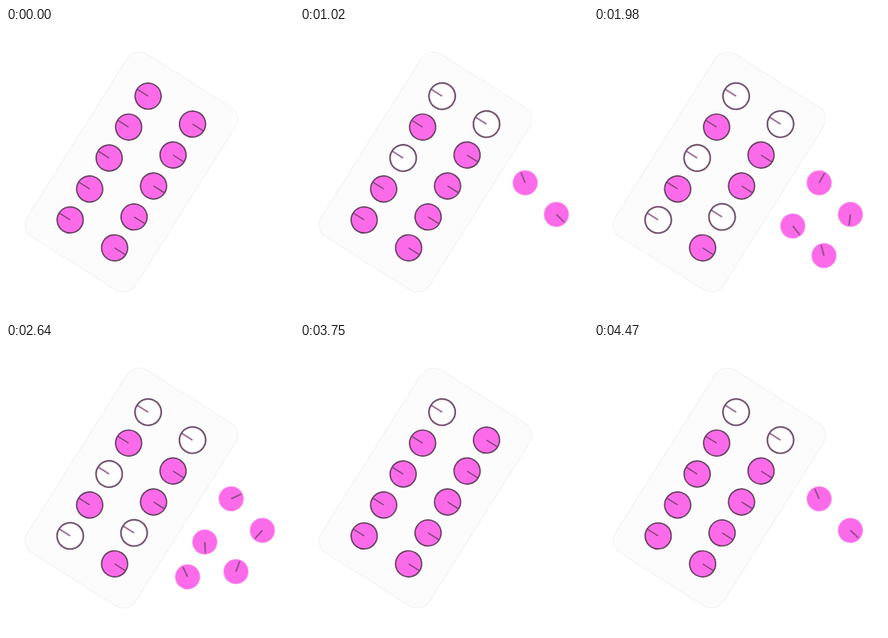
Recreate the animation shown at these times as an HTML page. Size 360 by 360 pixels, loop 4500 ms.

```html
<!DOCTYPE html>
<html lang="en">
<head>
<meta charset="utf-8">
<title>Blister pack</title>
<style>
  html, body { margin: 0; width: 100%; height: 100%; overflow: hidden; background: #fff; }
  svg { display: block; width: 100vw; height: 100vh; }
  .card { fill: #fcfcfc; stroke: #f5f1f4; stroke-width: 1; }
  .cell { stroke: #64405f; stroke-width: 1.7; }
  .mark { stroke: #7d4276; stroke-width: 1.5; }
  .full, .pill { fill: #fb6be9; }
  .empty { fill: #fff; }
</style>
</head>
<body>
<svg id="stage" viewBox="0 0 360 360"></svg>
<script>
  const LOOP = 4500;
  const CYCLE = 3480;    // everything refills here, then starts over
  const GAP = 420;       // time between two pills
  const SPIN = 0.054;    // degrees per ms
  const TILT = 32.2;
  const COL = 65.6, ROW = 45.7;

  // cell (column, row) each pill leaves, and where it lands
  const PILLS = [
    { cell: [0, 0], x: 281.5, y: 193.5 },
    { cell: [1, 0], x: 320.5, y: 233 },
    { cell: [0, 2], x: 287.5, y: 284.5 },
    { cell: [1, 3], x: 248.5, y: 247.5 },
    { cell: [0, 4], x: 227, y: 291 }
  ];

  const stage = document.getElementById('stage');
  const timing = { duration: LOOP, iterations: Infinity };

  function add(parent, tag, attrs) {
    const el = document.createElementNS('http://www.w3.org/2000/svg', tag);
    for (const key in attrs) el.setAttribute(key, attrs[key]);
    return parent.appendChild(el);
  }

  function place(parent, x, y) {
    return add(parent, 'g', { transform: `translate(${x} ${y})` });
  }

  // disc with a line from its centre to the rim
  function disc(parent, r, len, className, angle) {
    const g = add(parent, 'g', {});
    add(g, 'circle', { r, class: className });
    add(g, 'line', { y2: -len, class: 'mark', transform: `rotate(${angle})` });
    return g;
  }

  // visible from `start` to the end of each cycle
  function showFrom(el, start) {
    const steps = [[0, 0], [start, 1], [CYCLE, 0]];
    if (CYCLE + start < LOOP) steps.push([CYCLE + start, 1]);
    steps.push([LOOP, steps[steps.length - 1][1]]);
    el.animate(steps.map(([t, opacity]) => ({
      offset: t / LOOP, opacity, easing: 'steps(1, end)'
    })), timing);
  }

  function spin(el, start) {
    const pose = t => `rotate(${(t - start) * SPIN}deg)`;
    el.animate([
      { offset: 0, transform: pose(0) },
      { offset: CYCLE / LOOP, transform: pose(CYCLE) },
      { offset: CYCLE / LOOP, transform: pose(0) },
      { offset: 1, transform: pose(LOOP - CYCLE) }
    ], timing);
  }

  const pack = add(stage, 'g', { transform: `translate(156.7 180) rotate(${TILT})` });
  add(pack, 'rect', { x: -80, y: -135, width: 160, height: 270, rx: 18, class: 'card' });

  for (let row = 0; row < 5; row++) {
    for (let col = 0; col < 2; col++) {
      const spot = place(pack, (col - 0.5) * COL, (row - 2) * ROW);
      disc(spot, 16.3, 16, 'cell full', col ? 90 : -90);
      const i = PILLS.findIndex(p => p.cell[0] === col && p.cell[1] === row);
      if (i >= 0) showFrom(disc(spot, 16.3, 16, 'cell empty', -90), 170 + i * GAP);
    }
  }

  PILLS.forEach(({ cell, x, y }, i) => {
    const start = 359 + i * GAP;
    const pill = disc(place(stage, x, y), 15.5, 14, 'pill', TILT + (cell[0] ? 90 : -90));
    showFrom(pill, start);
    spin(pill, start);
  });

  // line all animations up on page time
  document.getAnimations().forEach(a => { a.startTime = 0; });
</script>
</body>
</html>
```
